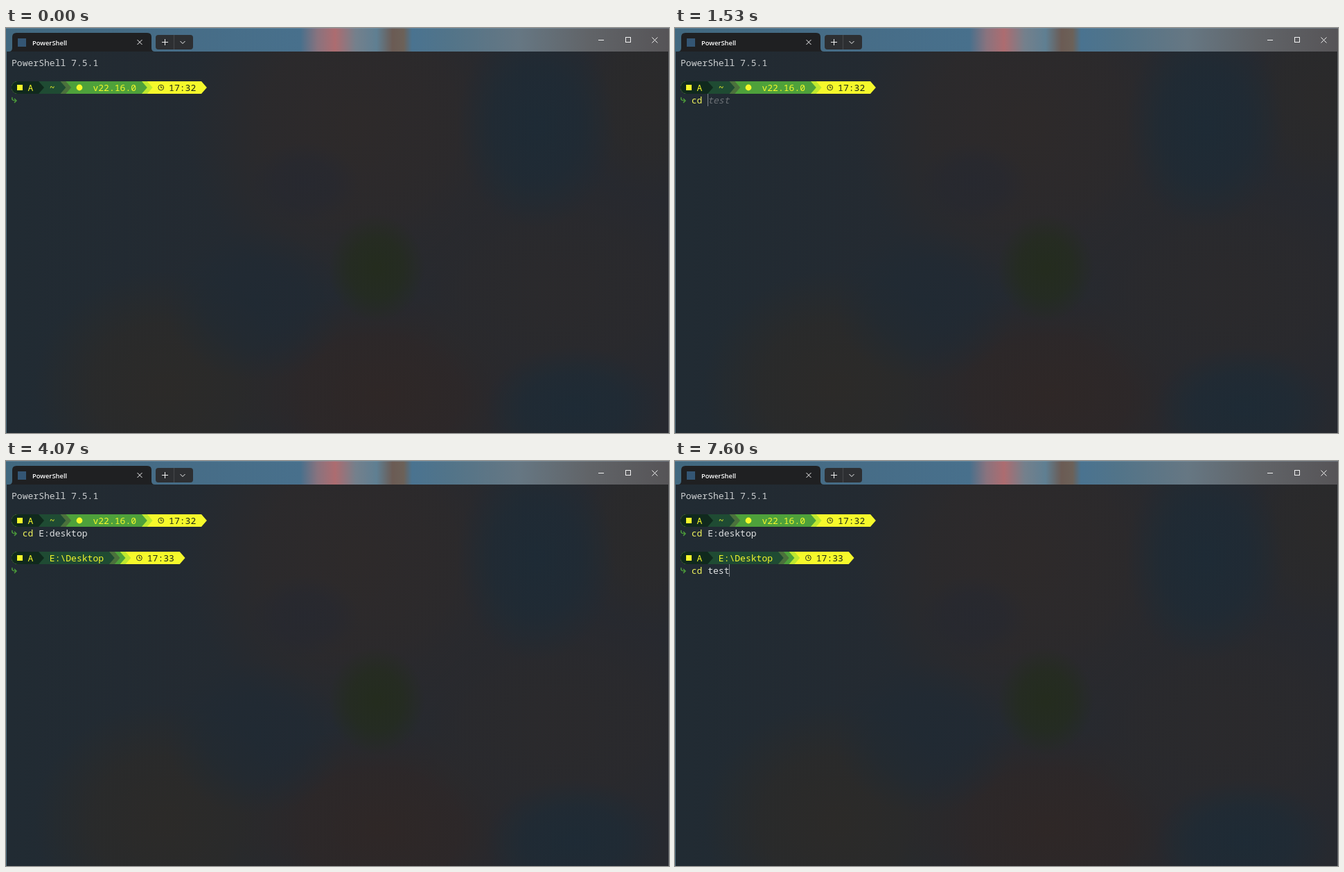
These frames come from a looping animation (957 px wide and 585 px high, 8 s). An HTML page with a canvas:

```html
<!DOCTYPE html>
<html lang="en">
<head>
<meta charset="utf-8">
<title>Terminal</title>
<style>
  html, body { margin: 0; width: 100%; height: 100%; overflow: hidden; background: #242a30; }
  canvas { display: block; }
</style>
</head>
<body>
<canvas id="stage" width="957" height="585"></canvas>
<script>
const W = 957, H = 585, LOOP = 8000;
const CELL = 7.83, LINE = 18, LEFT = 8, TOP = 41;
const MONO = '13.05px "Noto Sans Mono", "DejaVu Sans Mono", monospace';
const COLORS = {
  plain: '#cccfd1', command: '#eff35c', hint: '#6c7176', caret: '#7d8388',
  deep: '#10291d', forest: '#1f4b33', olive: '#4b713c', green: '#4ea13b',
  lime: '#bfe82f', yellow: '#f6f92b'
};
const ctx = document.getElementById('stage').getContext('2d');
const colX = col => LEFT + col * CELL;
const rowY = row => TOP + row * LINE;

// Each state holds from its start time: [time, typed, hint, caret visible]
const FIRST_LINE = [
  [0, '', '', false],
  [600, 'c', 'd test', false],
  [1200, 'cd', ' test', false],
  [1530, 'cd ', 'test', true],
  [2200, 'cd ', 'test', false],
  [2730, 'cd E', ':desktop', true],
  [3270, 'cd E:desktop', '', true],
  [3870, 'cd E:desktop', '', false]
];
const SECOND_LINE = [
  [4070, '', '', false],
  [4130, '', '', true],
  [4670, '', '', false],
  [5200, '', '', true],
  [5270, 'c', 'd E:desktop', true],
  [5400, 'cd', ' E:desktop', true],
  [5870, 'cd ', 'E:desktop', true],
  [6530, 'cd ', 'E:desktop', false],
  [7000, 'cd t', 'est', true],
  [7130, 'cd te', 'st', true],
  [7400, 'cd tes', 't', true],
  [7600, 'cd test', '', true]
];

function text(c, str, col, row, color, style = '') {
  c.font = style + MONO;
  c.fillStyle = color;
  c.fillText(str, colX(col), rowY(row) + 14);
}

function roundRect(c, x, y, w, h, radius, color) {
  c.beginPath();
  c.roundRect(x, y, w, h, radius);
  c.fillStyle = color;
  c.fill();
}

function disc(c, x, y, r, color) {
  c.beginPath();
  c.arc(x, y, r, 0, Math.PI * 2);
  c.fillStyle = color;
  c.fill();
}

function polyline(c, points, color, width = 1) {
  c.beginPath();
  points.forEach(([x, y]) => c.lineTo(x, y));
  c.strokeStyle = color;
  c.lineWidth = width;
  c.stroke();
}

function glow(c, x, y, rx, ry, rgb, alpha) {
  c.save();
  c.translate(x, y);
  c.scale(rx, ry);
  const g = c.createRadialGradient(0, 0, 0, 0, 0, 1);
  g.addColorStop(0, `rgba(${rgb},${alpha})`);
  g.addColorStop(0.55, `rgba(${rgb},${alpha * 0.75})`);
  g.addColorStop(1, `rgba(${rgb},0)`);
  c.fillStyle = g;
  c.fillRect(-1, -1, 2, 2);
  c.restore();
}

function drawBackdrop(c) {
  const base = c.createLinearGradient(0, 0, W, 0);
  base.addColorStop(0, '#212b33');
  base.addColorStop(0.35, '#242a31');
  base.addColorStop(1, '#27292f');
  c.fillStyle = base;
  c.fillRect(0, 0, W, H);
  glow(c, 510, 140, 250, 250, '46,42,42', 0.95);
  glow(c, 230, 520, 190, 170, '44,42,40', 0.95);
  glow(c, 540, 530, 210, 150, '47,39,38', 0.95);
  glow(c, 790, 380, 240, 170, '43,42,44', 0.9);
  glow(c, 930, 100, 110, 150, '43,42,42', 0.9);
  glow(c, 765, 140, 115, 150, '29,43,54', 0.9);
  glow(c, 820, 550, 130, 90, '29,43,54', 0.9);
  glow(c, 360, 400, 130, 110, '31,42,52', 0.7);
  glow(c, 430, 225, 80, 60, '37,40,49', 0.7);
  glow(c, 535, 347, 70, 78, '36,44,30', 1);
}

function drawTitleBar(c) {
  const stops = [
    [0, '#41687f'], [230, '#466c86'], [425, '#48708c'], [450, '#8a737e'],
    [475, '#ad6c70'], [505, '#74808c'], [535, '#5f7f92'], [558, '#6b5b54'],
    [574, '#6c6158'], [586, '#4a7390'], [640, '#527489'], [740, '#667783'],
    [840, '#616468'], [957, '#565457']
  ];
  const bar = c.createLinearGradient(0, 0, W, 0);
  stops.forEach(([x, color]) => bar.addColorStop(x / W, color));
  c.fillStyle = bar;
  c.fillRect(0, 0, W, 34);
  c.fillStyle = 'rgba(150,180,200,.3)';
  c.fillRect(0, 0, W, 1);

  // Active tab with flared foot
  c.beginPath();
  c.moveTo(4, 34);
  c.quadraticCurveTo(9, 34, 9, 29);
  c.lineTo(9, 13);
  c.quadraticCurveTo(9, 7, 15, 7);
  c.lineTo(204, 7);
  c.quadraticCurveTo(210, 7, 210, 13);
  c.lineTo(210, 29);
  c.quadraticCurveTo(210, 34, 215, 34);
  c.fillStyle = '#1f2022';
  c.fill();
  c.fillStyle = '#345674';
  c.fillRect(17, 15, 12, 12);
  c.font = '600 9.4px "Open Sans", "Noto Sans", sans-serif';
  c.fillStyle = '#fff';
  c.fillText('PowerShell', 38, 24.5);

  roundRect(c, 216, 10, 54, 21, 4, '#2d2f32');
  c.fillStyle = '#46494c';
  c.fillRect(242, 10, 1, 21);
  const cross = (x, y, r) => {
    polyline(c, [[x - r, y - r], [x + r, y + r]], '#f2f2f2');
    polyline(c, [[x + r, y - r], [x - r, y + r]], '#f2f2f2');
  };
  cross(193, 20.5, 3.5);
  cross(936.5, 17.5, 4);
  polyline(c, [[225, 20.5], [234, 20.5]], '#f2f2f2');
  polyline(c, [[229.5, 16], [229.5, 25]], '#f2f2f2');
  polyline(c, [[251.5, 19], [255, 22.5], [258.5, 19]], '#f2f2f2');
  polyline(c, [[855, 17.5], [863, 17.5]], '#f2f2f2');
  c.strokeRect(894.5, 13.5, 7, 7);

  c.fillStyle = '#52717f';
  c.fillRect(0, 34, 1, H - 34);
  c.fillStyle = '#595d61';
  c.fillRect(W - 1, 34, 1, H - 34);
}

function clock(c, col, row) {
  const x = colX(col) + 4.3, y = rowY(row) + 9;
  c.beginPath();
  c.arc(x, y, 3.9, 0, Math.PI * 2);
  c.strokeStyle = '#30391d';
  c.lineWidth = 1;
  c.stroke();
  polyline(c, [[x, y - 2.5], [x, y + 0.3], [x + 2, y + 0.3]], '#30391d');
}

function hook(c, row) {
  const y = rowY(row);
  c.beginPath();
  c.moveTo(9, y + 5);
  c.bezierCurveTo(8, y + 9, 10, y + 10, 14.5, y + 10);
  c.strokeStyle = COLORS.green;
  c.lineWidth = 1.4;
  c.stroke();
  polyline(c, [[12, y + 7], [15, y + 10], [12, y + 13]], COLORS.green, 1.4);
}

// Segments are [end column, color]; later ones lie beneath earlier ones.
function drawPrompt(c, row, segments, labels) {
  const y = rowY(row);
  [...segments].reverse().forEach(([end, color]) => {
    const x = colX(end);
    c.beginPath();
    c.moveTo(17, y);
    c.lineTo(x, y);
    c.lineTo(x + CELL, y + LINE / 2);
    c.lineTo(x, y + LINE);
    c.lineTo(17, y + LINE);
    c.arc(17, y + LINE / 2, LINE / 2, Math.PI / 2, Math.PI * 1.5);
    c.fillStyle = color;
    c.fill();
  });
  c.fillStyle = COLORS.yellow;
  c.fillRect(16, y + 5, 8, 8);
  labels.forEach(([str, col, color]) => text(c, str, col, row, color));
  hook(c, row + 1);
}

function firstPrompt(c) {
  drawPrompt(c, 2, [
    [5, COLORS.deep], [9, COLORS.forest], [10, COLORS.olive],
    [24, COLORS.green], [25, COLORS.lime], [35, COLORS.yellow]
  ], [
    ['A', 3, COLORS.yellow], ['~', 7, COLORS.yellow],
    ['v22.16.0', 15, COLORS.yellow], ['17:32', 29, '#1d2917']
  ]);
  disc(c, 106, rowY(2) + 9, 4.4, COLORS.yellow);
  clock(c, 27, 2);
}

function secondPrompt(c) {
  drawPrompt(c, 5, [
    [5, COLORS.deep], [18, COLORS.forest], [19, COLORS.olive],
    [20, COLORS.green], [21, COLORS.lime], [31, COLORS.yellow]
  ], [
    ['A', 3, COLORS.yellow], ['E:\\Desktop', 7, COLORS.yellow],
    ['17:33', 25, '#1d2917']
  ]);
  clock(c, 23, 5);
}

function drawInput(c, states, row, t) {
  const state = states.filter(s => s[0] <= t).pop();
  if (!state) return;
  const [, typed, hint, caret] = state;
  const end = 2 + typed.length;
  text(c, typed.slice(0, 2), 2, row, COLORS.command);
  text(c, typed.slice(2), 4, row, '#e0e2e3');
  text(c, hint, end, row, COLORS.hint, 'italic ');
  if (caret) {
    c.fillStyle = COLORS.caret;
    c.fillRect(Math.floor(colX(end)), rowY(row), 1, LINE);
  }
}

// The pointer sweeps in from the upper right, dips, then leaves leftwards.
function drawPointer(c, t) {
  const step = Math.floor(t * 0.015 + 0.1);
  if (step < 1 || step > 7) return;
  const p = Math.min(1, (step - 1) / 4), q = Math.max(0, (step - 5) / 2);
  const x = 143.5 + 703.5 * (1 - p) ** 1.4 - 107 * q;
  const y = 172 - 160 * (1 - p) ** 1.4 - 50 * q;
  disc(c, x, y, 25, '#252ace');
  c.beginPath();
  [[0, 0], [0, 14], [3.3, 11], [5.5, 16], [7.6, 15], [5.4, 10.2], [9.8, 10.2]]
    .forEach(([dx, dy]) => c.lineTo(x + dx, y + dy));
  c.closePath();
  c.fillStyle = '#fff';
  c.fill();
  c.strokeStyle = '#15171c';
  c.lineWidth = 0.6;
  c.stroke();
}

const scenery = document.createElement('canvas');
scenery.width = W;
scenery.height = H;
const sc = scenery.getContext('2d');
drawBackdrop(sc);
drawTitleBar(sc);
text(sc, 'PowerShell 7.5.1', 0, 0, COLORS.plain);
firstPrompt(sc);

function render(now) {
  const t = now % LOOP;
  ctx.drawImage(scenery, 0, 0);
  drawInput(ctx, FIRST_LINE, 3, t);
  if (t >= 4070) secondPrompt(ctx);
  drawInput(ctx, SECOND_LINE, 6, t);
  drawPointer(ctx, t);
}

let start;
function tick(now) {
  start ??= now;
  render(Math.max(0, now - start));
  requestAnimationFrame(tick);
}
render(0);
requestAnimationFrame(tick);
</script>
</body>
</html>
```
